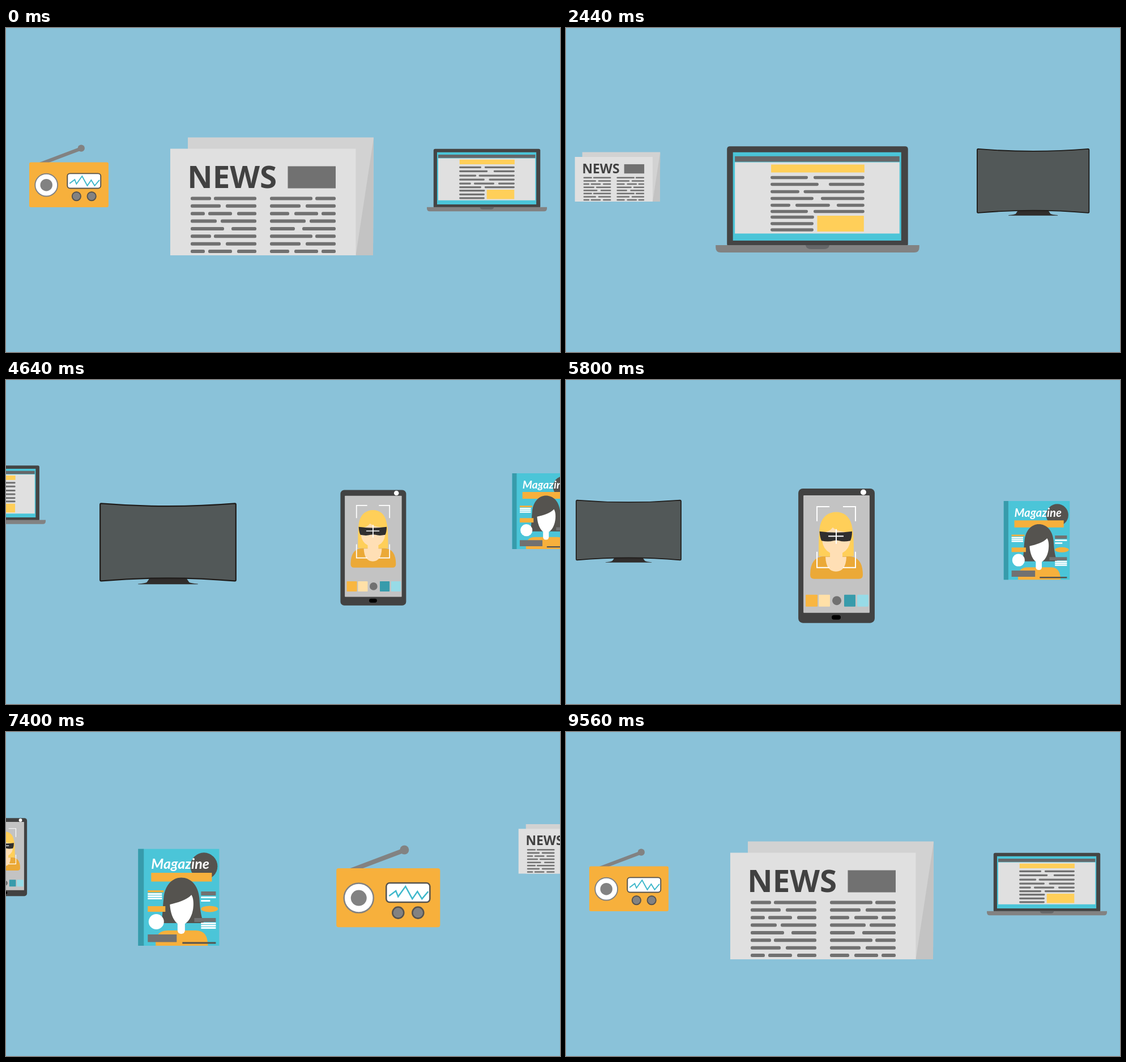
Animation, 978 px wide and 573 px high, one loop 9.6 s. Source, as an HTML page:

```html
<!DOCTYPE html>
<html lang="en">
<head>
<meta charset="utf-8">
<title>Media carousel</title>
<style>
  html, body { margin: 0; width: 100%; height: 100%; overflow: hidden; background: #8ac2d9; }
  svg { display: block; width: 100%; height: 100%; }
  .ink { fill: #717171; }
  .dark { fill: #55534f; }
  .orange { fill: #f7b03c; }
  .yellow { fill: #ffcf59; }
  .skin { fill: #ffdfb5; }
  .white { fill: #fff; }
  .line { fill: none; stroke: #fff; stroke-width: 2; }
  .knob { fill: #828282; stroke: #55534f; stroke-width: 2.5; }
</style>
</head>
<body>
<svg viewBox="0 0 978 573">
  <g id="news">
    <path fill="#d2d2d2" d="M321 193.5H649L648 402H321z"/>
    <path fill="#c3c3c3" d="M649 195L648 402H617.5z"/>
    <path fill="#e0e0e0" d="M290 213.5H617.5V402H290z"/>
    <text x="320.3" y="283" font-family="'Open Sans', sans-serif" font-weight="700" font-size="54.6" fill="#414141">NEWS</text>
    <rect class="ink" x="497.5" y="244.5" width="84.5" height="39"/>
  </g>

  <g id="laptop">
    <rect x="284" y="209" width="320" height="178" rx="5" fill="#444"/>
    <path fill="#4bc5d8" d="M294.5 219.5H592V376H294.5z"/>
    <path fill="#666769" d="M298 226.5H589V236.5H298z"/>
    <path fill="#e0e0e0" d="M298 237.5H589V363.5H298z"/>
    <path class="yellow" d="M362 241.5H527V255.5H362zM443.5 332H526V360H443.5z"/>
    <path fill="#828282" d="M264 384H624V388Q624 397 615 397H273Q264 397 264 388z"/>
    <path fill="#666769" d="M423 384H465Q464 391 456 391H432Q424 391 423 384z"/>
  </g>

  <g id="tv">
    <path fill="#302d2c" d="M490 393H578L585 403Q588 405 606 407V408H462V407Q480 405 483 403z"/>
    <path fill="#525858" stroke="#1f1c1a" stroke-width="3" stroke-linejoin="round"
      d="M373 213Q534 226 695 213Q697.5 213 697.5 216V397Q697.5 400 695 400Q534 386 373 400Q370.5 400 370.5 397V216Q370.5 213 373 213z"/>
  </g>

  <g id="phone">
    <rect x="410" y="192" width="135" height="238" rx="8" fill="#424242"/>
    <rect x="419" y="204" width="117" height="208" rx="1" fill="#c3c3c3"/>
    <circle class="white" cx="525" cy="198.5" r="5"/>
    <rect x="469" y="416" width="16" height="8" rx="4"/>
    <path fill="#eba937" d="M431 345Q431 313 455 312H500Q524 313 524 345Q524 352 517 352H438Q431 352 431 345z"/>
    <path class="yellow" d="M446 312C446 290 446 272 448 260C451 242 463 233.5 477 233.5C491 233.5 502 242 505 260C508 272 508 290 508 312z"/>
    <path class="skin" d="M452 270Q464 270 471 261Q477 268 502 270V284Q500 300 488 306V313H495Q494 339 476.5 339Q459 339 458 313H466V306Q454 300 452 284z"/>
    <path fill="#302f2f" d="M447.5 268Q476 272 505 268Q505 278 502 284.5Q490 287 482 284.5Q477 283 472 284.5Q463 287 451 284.5Q448 278 447.5 268z"/>
    <path class="line" d="M463 276.5H490M477 264V290M443 250V224H465M489 224H511V250M443 304V332H465M489 332H511V304"/>
    <rect x="423" y="380" width="21" height="21" rx="1" fill="#f9b640"/>
    <rect x="446" y="380" width="20" height="21" rx="1" fill="#ffe0a8"/>
    <circle class="ink" cx="478" cy="390.5" r="8"/>
    <rect x="491" y="380" width="20" height="21" rx="1" fill="#379bab"/>
    <rect x="514" y="380" width="20" height="21" rx="1" fill="#97dbe7"/>
  </g>

  <g id="magazine">
    <path fill="#4bc5d8" d="M233 207H376V378H233z"/>
    <path fill="#379bab" d="M233 207H243V378H233z"/>
    <circle class="dark" cx="349" cy="237.5" r="24"/>
    <text class="white" x="256" y="242" font-family="Lato, cursive" font-style="italic" font-weight="700" font-size="25">Magazine</text>
    <path class="orange" d="M256 249H363V264.5H256z"/>
    <path class="dark" d="M273 338C277 325 276 310 278 294C280 270 294 257.5 309 257.5C325 257.5 339 270 341 294C342 312 344 328 349 338z"/>
    <path class="orange" d="M264 378Q262 351 285 351H335Q356 351 356 378z"/>
    <path class="white" d="M289 305C302 302 319 297 327 288C331 294 331 305 330 312C328 328 319 341 309 341C299 341 290 325 289 305z"/>
    <rect class="white" x="302.5" y="332" width="13" height="25" rx="6"/>
    <path class="orange" d="M250 280H278V283.5H250zM250 308H281V318H250z"/>
    <path class="white" d="M250 285H275V288H250zM250 289H275V292H250zM250 293H275V296H250z"/>
    <circle class="white" cx="265" cy="335.5" r="13.5"/>
    <path class="ink" d="M250 358H301V371.5H250zM344 282H370V289H344zM332 329H370V336H332z"/>
    <path class="white" d="M344 291H370V294H344zM344 297H360V300H344zM344 337H370V340H344zM344 341H370V344H344zM344 345H370V348H344z"/>
    <ellipse class="orange" cx="359" cy="313" rx="15" ry="5.5"/>
    <path class="dark" d="M311 371.5H370V374.5H311z"/>
  </g>

  <g id="radio">
    <path stroke="#828282" stroke-width="8" d="M608 245L703 209"/>
    <circle cx="703" cy="208.5" r="8" fill="#828282"/>
    <rect class="orange" x="583" y="241" width="183" height="104" rx="4"/>
    <circle cx="622.5" cy="293.5" r="26" fill="#fff" stroke="#828282" stroke-width="2.5"/>
    <circle cx="622.5" cy="293.5" r="14" fill="#828282"/>
    <rect x="671" y="267" width="77" height="34" rx="6" fill="#fff" stroke="#55534f" stroke-width="2.5"/>
    <path fill="none" stroke="#3fb8cb" stroke-width="2.5" d="M676 290L688 281L692 291L705 273L717 295L726 282L734 295L745 282"/>
    <circle class="knob" cx="692" cy="319.5" r="10"/>
    <circle class="knob" cx="727" cy="319.5" r="10"/>
  </g>
</svg>

<script>
const byId = id => document.getElementById(id);

function addBar(parent, x1, x2, y, height) {
  const bar = document.createElementNS("http://www.w3.org/2000/svg", "rect");
  const attrs = { class: "ink", x: x1, y: y - height / 2, width: x2 - x1, height, rx: 2.5 };
  for (const name in attrs) bar.setAttribute(name, attrs[name]);
  parent.append(bar);
}

// A row is a run of alternating bar starts and ends; the right column mirrors the left.
const newsRows = [
  [326, 362, 367, 442], [326, 379, 388, 442], [326, 351, 357, 399, 408, 442],
  [326, 372, 379, 442], [326, 385, 398, 442]
];
for (let row = 0; row < 8; row++) {
  const ends = newsRows[row % 5], y = 301.5 + row * 13.37;
  for (let i = 0; i < ends.length; i += 2) {
    addBar(byId("news"), ends[i], ends[i + 1], y, 6);
    addBar(byId("news"), 908 - ends[i + 1], 908 - ends[i], y, 6);
  }
}

const laptopRows = {
  264.5: [361, 427, 437, 527], 276.5: [361, 446, 464, 527], 289.5: [361, 412, 419.5, 527],
  301.5: [361, 437, 450, 527], 313.5: [361, 396, 405, 466, 478, 527],
  324.5: [361, 427, 437, 527], 334.5: [361, 438], 346: [361, 437], 357: [361, 437]
};
for (const y in laptopRows) {
  const ends = laptopRows[y];
  for (let i = 0; i < ends.length; i += 2) addBar(byId("laptop"), ends[i], ends[i + 1], +y, 5.5);
}

// Each pose is [centre x, centre y, size]; "drawn" is the pose of the artwork itself.
const items = [
  { id: "news", drawn: [469.5, 297.75, 359], centre: [469.5, 297.75, 359], left: [106, 270.4, 150.5], right: [847, 270.5, 150.5] },
  { id: "laptop", drawn: [444, 303, 360], centre: [464.2, 304.7, 369.4], left: [140.5, 278, 211], right: [849, 269, 212], shrink: 0.9 },
  { id: "tv", drawn: [534, 310, 330.5], centre: [534, 310, 330.5], left: [131, 276.7, 187], right: [844, 270, 190.8] },
  { id: "phone", drawn: [477.5, 311, 238], centre: [508, 313.6, 246], left: [112, 277, 138], right: [873, 269.5, 138] },
  { id: "magazine", drawn: [304.5, 292.5, 171], centre: [489, 302.5, 203], left: [90, 280.7, 134], right: [859.5, 282, 134] },
  { id: "radio", drawn: [674.5, 273, 183], centre: [489, 286, 233.5], left: [111, 262, 140], right: [834, 262, 140] }
];
// All items leave to and arrive from the same two points beyond the stage.
for (const item of items) {
  const { left, centre, right, shrink = 1 } = item;
  const gone = [-135, 156, left[2] * shrink];
  const waiting = [1094, 152, right[2] * shrink];
  item.path = [gone, left, centre, right, waiting];
  item.node = byId(item.id);
}

const LOOP = 9600, TICK = 40;
const moves = [[1000, 12], [2440, 16], [4360, 13], [5800, 13], [7200, 13], [9160, 11]];

function carouselPosition(time) {
  return moves.reduce((sum, [start, steps]) => {
    const step = Math.floor((time - start) / TICK) + 1;
    return sum + Math.min(Math.max(step / steps, 0), 1);
  }, 0);
}

function render(time) {
  const position = carouselPosition(time);
  const stop = Math.floor(position), progress = position - stop;
  items.forEach(({ node, drawn, path }, index) => {
    // Slots: 1 left, 2 centre, 3 right, 4 waiting, 0 and 5 out of sight.
    const slot = (index - stop + 8) % 6;
    const visible = slot >= 1 && slot <= 4;
    node.style.display = visible ? "" : "none";
    if (!visible) return;
    const [x, y, size] = path[slot].map((from, k) => from + (path[slot - 1][k] - from) * progress);
    node.setAttribute("transform",
      `translate(${x} ${y}) scale(${size / drawn[2]}) translate(${-drawn[0]} ${-drawn[1]})`);
  });
}

const begin = performance.now();
function frame() {
  render((performance.now() - begin) % LOOP);
  requestAnimationFrame(frame);
}
frame();
</script>
</body>
</html>
```
